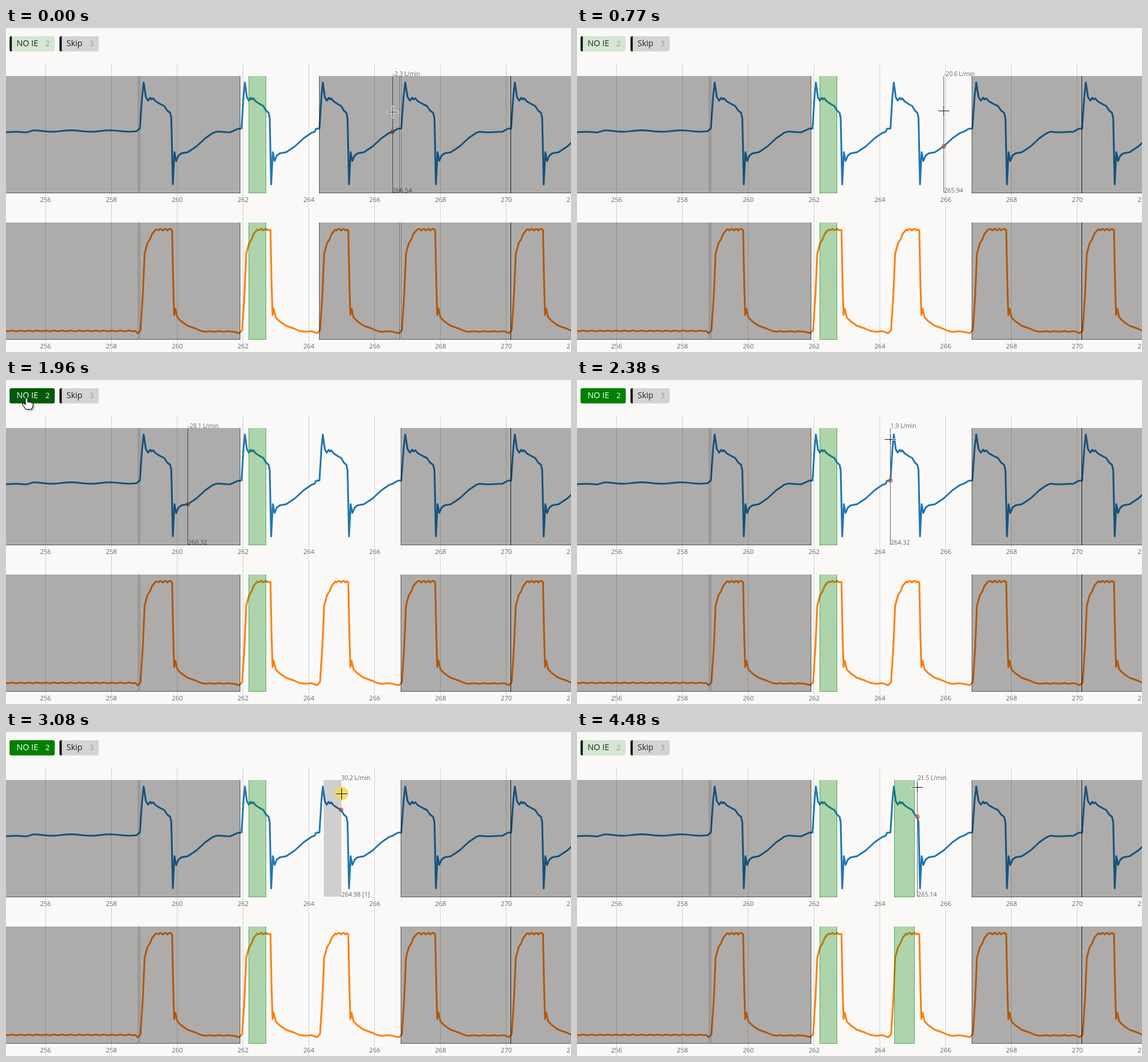
These frames come from a looping animation (962 px wide and 553 px high, 4550 ms). An HTML page with a canvas:

```html
<!DOCTYPE html>
<html lang="en">
<head>
<meta charset="utf-8">
<title>Flow and pressure annotation</title>
<style>
html, body { margin: 0; width: 100%; height: 100%; overflow: hidden; background: #faf9f7; }
canvas { display: block; }
</style>
</head>
<body>
<canvas id="stage" width="962" height="553"></canvas>
<script>
const g = document.getElementById('stage').getContext('2d');
const LOOP = 4550, STEP = 70, SANS = 'px "Open Sans", sans-serif';
const GREEN = '0,128,0', BLACK = '0,0,0';
const PLOTS = [82, 332];
const toX = s => 67.4 + (s - 256) * 56.04;
const snap = x => Math.round(((x - 67.4) / 56.04 + 256) * 50) / 50;

// All breaths share these shapes: "in" spans a breath, the others are pixels from its start or end
const flowIn = [0,171.4, .07,117, .12,93, .19,118, .26,124, .33,119, .37,122, .42,120, .5,125, .56,127,
  .69,131, .773,133, .87,141, .961,144.8, 1,154];
const flowOut = [2.5,267, 5.3,212, 8.3,227, 12,218, 17,214, 28,212.1, 42.9,202, 58,188, 71,179, 76.6,177.1];
const pressureIn = [0,516, 4,455, 7,385, 12,367, 16,361, 20,351, 26,344];
const pressureOut = [0,345, 2,440, 3.5,490, 5.5,479, 9,494, 16,501, 26,508, 40,513, 49,517];
const breaths = [[228, 281.5], [401, 449], [533.7, 581.5], [673, 729.5], [860, 913]];

const flow = [], pressure = [];
const place = (to, list, dx, scale = 1) => {
  for (let i = 0; i < list.length; i += 2) to.push(dx + list[i] * scale, list[i + 1]);
};
const ripple = (to, from, end, step, y, size) => {
  for (let x = from; x < end; x += step) to.push(x, y + Math.sin(x * 1.7) * size);
};

ripple(flow, 0, 40, 7, 178, .7);
ripple(flow, 47, 224, 7, 175.8, 1.2);
ripple(pressure, 0, 222, 5, 517, .9);
breaths.forEach(([start, end], i) => {
  const next = i < 4 ? breaths[i + 1][0] : 1000;
  place(flow, flowIn, start, end - start);
  place(flow, flowOut, end);
  ripple(flow, end + 84, next - 14, 8, 177.5, .6);
  flow.push(next - 6, 172);

  pressure.push(start - 4, 521);
  place(pressure, pressureIn, start + 1);
  ripple(pressure, start + 29, end, 2.5, 344, 1.6);
  place(pressure, pressureOut, end + 1.3);
  ripple(pressure, end + 59, next - 10, 6, 518, .7);
});

// Pointer track: time, x, y
const track = [
  [0,658,143], [140,658,143], [280,624,141], [910,624,141], [980,575,134], [1120,309.5,84], [1190,195,42],
  [1330,55,29], [1400,35,30], [1960,35,30], [2030,65,37], [2240,395,90], [2310,490,98], [2380,533.5,101],
  [2660,541,104], [2870,541,104], [2940,541,104], [3080,571,105], [3150,575,104], [3290,575,104],
  [3570,579,97], [4340,579,97], [4480,579.5,94], [4550,579.5,94]
];

function pointer(t) {
  const i = Math.max(1, track.findIndex(p => p[0] >= t));
  const [a, b] = [track[i - 1], track[i]];
  const k = (t - a[0]) / (b[0] - a[0]);
  return [a[1] + (b[1] - a[1]) * k, a[2] + (b[2] - a[2]) * k];
}

function flowAt(x) {
  let i = 2;
  while (flow[i] < x) i += 2;
  const k = (x - flow[i - 2]) / (flow[i] - flow[i - 2]);
  return flow[i - 1] + (flow[i + 1] - flow[i - 1]) * k;
}

function box(x, y, w, h, color) {
  g.fillStyle = color;
  g.fillRect(x, y, w, h);
}

function text(s, x, y, size, color, align = 'left') {
  g.font = size + SANS;
  g.textAlign = align;
  g.fillStyle = color;
  g.fillText(s, x, y);
}

function trace(points, color) {
  g.beginPath();
  for (let i = 0; i < points.length; i += 2) g.lineTo(points[i], points[i + 1]);
  g.strokeStyle = color;
  g.lineWidth = 3;
  g.lineJoin = 'round';
  g.stroke();
}

function button(x, w, label, key, rgb, bar, active, fill) {
  g.save();
  g.beginPath();
  g.roundRect(x, 14, w, 26, 3);
  g.clip();
  box(x, 14, w, 26, active ? fill : `rgba(${rgb},.15)`);
  if (!active) box(x, 14, 4, 26, bar);
  g.restore();
  text(label, x + 12, 31, 14, active ? '#fff' : '#222');
  text(key, x + w - 16, 31, 13, active ? '#fff' : '#999');
}

function region(x0, x1, rgb, alpha = .31) {
  const edge = `rgba(${rgb},.5)`;
  for (const y of PLOTS) {
    box(x0, y, x1 - x0, 200, `rgba(${rgb},${alpha})`);
    box(x0, y, 1, 200, edge);
    box(x1 - 1, y, 1, 200, edge);
    box(x0, y + 199, x1 - x0, 1, edge);
  }
}

function grid() {
  for (let s = 256; s <= 272; s += 2) {
    const x = toX(s);
    for (const [y, h] of [[62, 225], [299, 238], [549, 4]]) box(Math.floor(x), y, 1, h, '#d2d1cf');
    for (const y of PLOTS) text(s, x, y + 214.5, 11, '#666', 'center');
  }
}

function readout(x, dragging) {
  const s = snap(x), px = toX(s), y = flowAt(px);
  if (!dragging) box(Math.floor(px), 82, 1, 199, '#666');
  g.beginPath();
  g.arc(px, y, 3, 0, 7);
  g.strokeStyle = '#d9541e';
  g.lineWidth = 1.3;
  g.stroke();
  text(((174 - y) / 1.357).toFixed(1) + ' L/min', px + .3, 82, 10, '#666');
  text(s.toFixed(2) + (dragging ? ' [1]' : ''), px + .3, 281, 10.5, '#666');
}

function shape(path, x, y, fill, stroke) {
  const p = new Path2D(path);
  g.save();
  g.translate(x, y);
  g.shadowColor = 'rgba(0,0,0,.4)';
  g.shadowBlur = 3;
  g.shadowOffsetX = g.shadowOffsetY = 2;
  g.fillStyle = fill;
  g.fill(p);
  g.shadowColor = 'transparent';
  g.strokeStyle = stroke;
  g.lineWidth = 1.2;
  g.stroke(p);
  g.restore();
}

function cursor(x, y, overButton, pressed) {
  if (pressed) {
    g.beginPath();
    g.arc(x, y, 12, 0, 7);
    g.fillStyle = 'rgba(238,218,96,.85)';
    g.fill();
  }
  if (y >= 82) {
    x = Math.floor(x);
    y = Math.floor(y);
    if (!pressed) {
      box(x - 10, y - 1, 21, 3, '#fff');
      box(x - 1, y - 10, 3, 21, '#fff');
    }
    box(x - 9, y, 19, 1, '#111');
    box(x, y - 9, 1, 19, '#111');
  } else if (overButton) {
    shape('M-2 1Q0-1 2 1V8Q4 6 5 8Q7 7 8 9Q11 8 11 11V15L8 20H-1L-7 12Q-7 9-4 10L-2 12Z', x, y, '#fff', '#111');
  } else {
    shape('M0 0V20L4.5 16L8 24L12 22L8.5 14.5H14Z', x, y, '#0a0a0a', '#fff');
  }
}

function draw(t) {
  const within = (a, b) => t >= a && t < b;
  const [x, y] = pointer(t);
  const overButton = x >= 6 && x < 83 && y >= 14 && y < 40;
  const dragging = within(2940, 3290);
  const pressed = dragging || within(420, 490) || within(1470, 1540);
  const picked = within(490, 770);
  const armed = within(1540, 3290);

  box(0, 0, 962, 553, '#faf9f7');
  button(6, 77, 'NO IE', '2', GREEN, '#10281a', armed, overButton ? '#005a0a' : '#008000');
  button(91, 67, 'Skip', '3', BLACK, '#1a1a1a', picked, '#000');
  grid();
  trace(flow, '#1f77b4');
  trace(pressure, '#ff7f0e');
  // The readout keeps its last place while the pointer is outside the plot
  readout(within(1120, 2240) ? 309.5 : x, dragging);

  region(-1, 226, BLACK);
  region(227, 399, BLACK);
  region(413, 443, GREEN);
  if (t < 770) region(533, 671, BLACK, picked ? .6 : .31);
  region(672, 860, BLACK);
  region(859, 963, BLACK);
  if (dragging) box(541, 82, Math.max(0, Math.floor(x) - 541), 199, 'rgba(0,0,0,.17)');
  if (t >= 3290) region(540, 575, GREEN);
  cursor(x, y, overButton, pressed);
}

const begin = performance.now();
function tick() {
  const t = (performance.now() - begin) % LOOP;
  draw(Math.floor(t / STEP) * STEP);
  requestAnimationFrame(tick);
}
tick();
</script>
</body>
</html>
```
